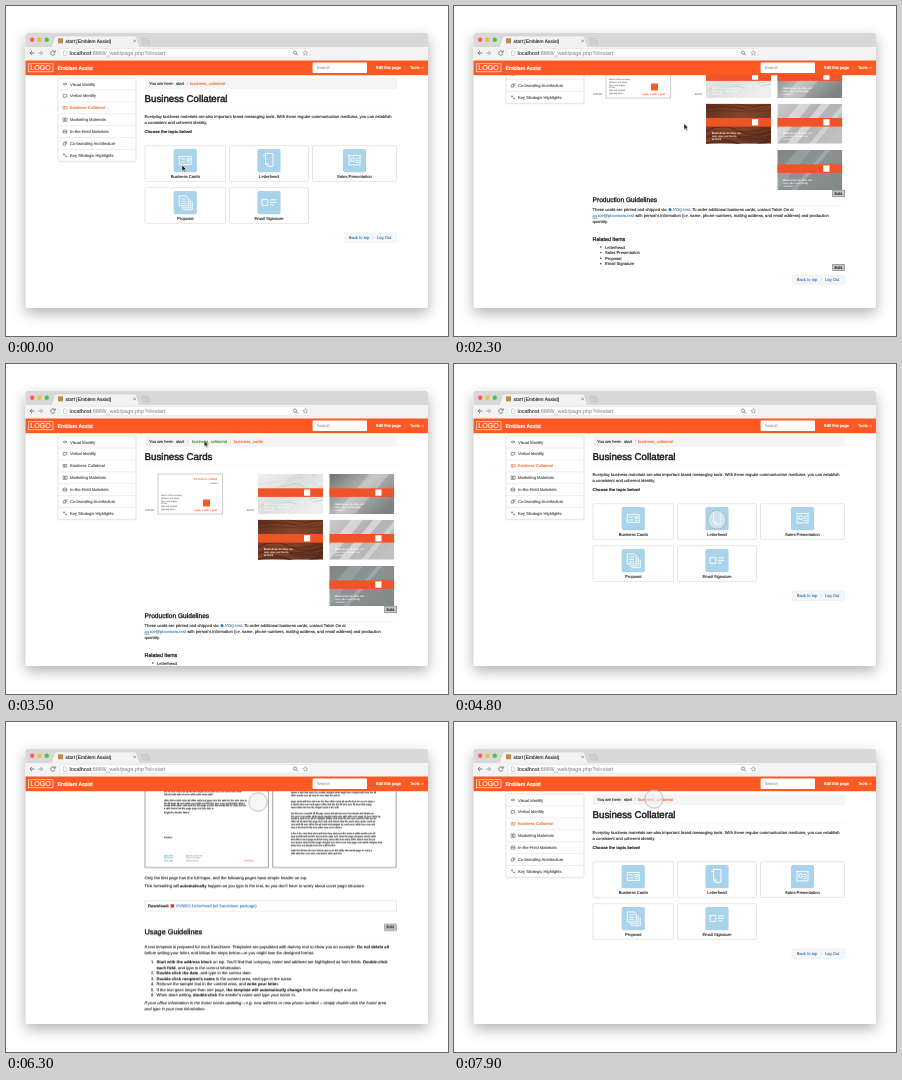
Animation of 442 by 330 pixels, one loop 8000 ms. Source, as an HTML page:

```html
<!DOCTYPE html>
<html lang="en">
<head>
<meta charset="utf-8">
<title>Style guide walkthrough</title>
<style>
  html, body { margin: 0; width: 100%; height: 100%; overflow: hidden; background: #fff; }
  svg { display: block; }
  #stage { width: 442px; height: 330px; }
  text { font-family: "Liberation Sans", Arial, sans-serif; text-rendering: geometricPrecision; white-space: pre; }
  .window { filter: drop-shadow(0 5px 7px rgba(0, 0, 0, .3)); }
</style>
</head>
<body>
<svg id="stage" viewBox="0 0 442 330"></svg>
<script>
const LOOP = 8000, STEP = 100;
const ORANGE = '#fc5a22', BLUE = '#2b74b3', GREEN = '#1f8f30', INK = '#151515';
const LEFT = 19.5, WIDTH = 402.5, RIGHT = LEFT + WIDTH;
const stage = document.getElementById('stage');

let seed = 7;
const rand = (a = 0, b = 1) => {
  seed = (seed * 16807) % 2147483647;
  return a + (b - a) * seed / 2147483647;
};

// Drawing helpers. In text, *...* is bold and [...] is a link.
const rect = (x, y, w, h, fill, extra = '') =>
  `<rect x="${x}" y="${y}" width="${w}" height="${h}" fill="${fill}" ${extra}/>`;
const path = (d, stroke, width = .6, extra = 'fill="none"') =>
  `<path d="${d}" stroke="${stroke}" stroke-width="${width}" ${extra}/>`;
const dot = (x, y, r, fill, extra = '') =>
  `<circle cx="${x}" cy="${y}" r="${r}" fill="${fill}" ${extra}/>`;
const markup = s => s
  .replace(/\*(.+?)\*/g, '<tspan font-weight="700">$1</tspan>')
  .replace(/\[(.+?)\]/g, `<tspan fill="${BLUE}" stroke="${BLUE}">$1</tspan>`);
const text = (x, y, s, size = 4.15, fill = INK, extra = '', weight = .02) =>
  `<text x="${x}" y="${y}" font-size="${size}" fill="${fill}" stroke="${fill}" stroke-width="${size * weight}" ${extra}>${markup(s)}</text>`;
const lines = (x, y, gap, list, ...style) =>
  list.map((s, i) => text(x, y + i * gap, s, ...style)).join('');
const medium = (x, y, s, size, fill = '#1a1a1a') => text(x, y, s, size, fill, '', .045);
const heading = (y, s, size) => medium(138.6, y, s, size) +
  path(`M139 ${y + size * .55}H391`, '#eee', .5);

// Browser chrome
const chrome = () => `
  <g class="window">${rect(LEFT, 27, WIDTH, 275, '#fff', 'rx="2"')}</g>
  <path d="M${LEFT} 41V29.5q0 -2.5 2.5 -2.5H${RIGHT - 2.5}q2.5 0 2.5 2.5V41Z" fill="#d8d8d8"/>
  ${dot(26.2, 33.8, 2.2, '#fb5f57')}${dot(33.4, 33.8, 2.2, '#f0bb40')}${dot(40.8, 33.8, 2.2, '#55c244')}
  ${path('M45 41.3L48.5 31.5Q49 30 50.5 30H128.5Q130 30 130.6 31.5L134 41.3Z', '#bbb', .4, 'fill="#f3f3f3"')}
  ${path('M135 32.5H142L144 38H137Z', '#b3b3b3', .4, 'fill="#cfcfcf"')}
  ${rect(52, 32.3, 5, 5, '#c08a4a')}
  ${text(59.5, 36.7, 'start &#91;Emblem Assist&#93;', 4.9, '#222')}
  ${path('M127.4 33.7L129.8 36.1M129.8 33.7L127.4 36.1', '#666', .6)}
  ${rect(LEFT, 41, WIDTH, 14, '#f3f3f3')}
  ${path('M28.5 47H24M26 45L24 47L26 49', '#666', .8)}
  ${path('M32 47H36.5M34.5 45L36.5 47L34.5 49', '#999', .8)}
  ${path('M48.8 45.9A2.2 2.2 0 1 0 49 47.7M49.2 44.5V46.2H47.4', '#666', .8)}
  ${rect(54, 42.7, 250, 8.7, '#fff', 'rx="1" stroke="#d0d0d0" stroke-width=".4"')}
  ${path('M57.5 44.8H59.7L60.8 46V49.4H57.5Z', '#888', .4)}
  ${text(63.5, 48.9, 'localhost<tspan fill="#999" stroke="#999">:8888/_web/page.php?id=start</tspan>', 5.5, '#333')}
  ${dot(289, 46.6, 1.6, 'none', 'stroke="#666" stroke-width=".7"')}${path('M290.2 47.8L291.8 49.5', '#666', .8)}
  ${path('M299.4 44.4L300.1 46.2L302 46.3L300.5 47.5L301 49.3L299.4 48.3L297.8 49.3L298.3 47.5L296.8 46.3L298.7 46.2Z', '#777', .5)}`;

const navbar = () => `
  ${rect(LEFT, 54.5, WIDTH, 14.7, ORANGE)}
  ${rect(22.5, 57.8, 24.5, 8, 'none', 'stroke="#fff" stroke-width=".6"')}
  ${text(24.3, 64.3, 'LOGO', 7.1, '#fff')}
  ${medium(51.5, 63.7, 'Emblem Assist', 5.4, '#fff')}
  ${rect(306.6, 56.5, 54.4, 10.6, '#fff', 'rx="1.2"')}
  ${text(310.7, 63.3, 'Search', 4.15, '#999')}
  ${medium(370, 63.4, 'Edit this page', 4.15, '#fff')}
  ${medium(404, 63.4, 'Tools', 4.15, '#fff')}
  <path d="M415.2 61.4H417.8L416.5 62.8Z" fill="#fff"/>`;

// Parts shared by the pages
const menu = [
  ['Visual Identity', 'M0 2Q2 0 4 2Q2 4 0 2M1.6 2H2.4'],
  ['Verbal Identity', 'M.2 .6H3.8V3H2L1 4V3H.2Z'],
  ['Business Collateral', 'M0 .7H4V3.3H0ZM.8 1.7H2M.8 2.4H3'],
  ['Marketing Materials', 'M0 .3H1.6V3.7H0ZM2.2 .3H4V3.7H2.2Z'],
  ['In-the-Field Materials', 'M0 1L2 .2L4 1V3.4H0ZM0 2H4'],
  ['Co-branding Architecture', 'M.3 1.2H2.5V3.7H.3ZM1.5 .3H3.7V2.8'],
  ['Key Strategic Highlights', 'M0 1H2M1 0V2M2 3H4M2 2L4 4']
];
const sidebar = active => rect(52, 72, 78, 83.3, '#fff', 'rx="1" stroke="#d4d4d4" stroke-width=".6"') +
  path('M52.3 155.9H130', '#e4e4e4', .6) +
  menu.map(([name, icon], i) => {
    const y = 78 + i * 11.9, color = i === active ? ORANGE : '#444';
    return (i ? path(`M52 ${y - 5.95}H130`, '#ddd', .5) : '') +
      `<g transform="translate(57 ${y - 2})">${path(icon, color, .5)}</g>` +
      text(64, y + 1.5, name, 4.1, color);
  }).join('');

const crumbs = (leaf) => {
  const y = 79.4;
  return rect(139, 72, 252, 11, '#f5f5f5', 'rx="1"') +
    text(143, y, 'You are here:') + text(170, y, 'start') + text(181, y, '/', 4.15, '#bbb') +
    (leaf ? text(186, y, 'business_collateral', 4.15, GREEN) + text(224, y, '/', 4.15, '#bbb') +
      text(228, y, leaf, 4.15, ORANGE) : text(184, y, 'business_collateral', 4.15, ORANGE));
};
const footer = y => rect(338, y, 52.5, 9.6, '#f4f6f8', 'rx="1" stroke="#e6e6e6" stroke-width=".4"') +
  text(342.7, y + 6.2, '[Back to top]') + text(366.7, y + 6.2, '/', 4.15, '#bbb') + text(370.7, y + 6.2, '[Log Out]');
const editButton = y => rect(378.7, y, 11.6, 6.3, '#c4c4c4', 'stroke="#777" stroke-width=".6"') +
  text(380.6, y + 4.6, '*Edit*', 3.9, '#222');

// Overview page
const tiles = [
  ['Business Cards', 0, 0, 'M-6 -4H6V4H-6ZM-4 1.5H0M-4 -1.5H0M2 2H4.5M1.8 -2H4.2V.3H1.8Z'],
  ['Letterhead', 1, 0, 'M-3.5 -7H4V6H-1L-3.5 3.5ZM-3.5 3.5H-1V6M-6 -5H-3.5'],
  ['Sales Presentation', 2, 0, 'M-6.5 -5H6.5M-5.5 -5V4.5H5.5V-5M-3.5 -2.5H-.5V1H-3.5ZM1 -2H4M1 0H4M1 2H4'],
  ['Proposal', 0, 1, 'M-6 -6.5H1L3 -4.5V3.5H-6ZM-4 5.5H5V-3M-2 7.3H7V-1M-4 -3.5H1M-4 -1H1M-4 1.3H1'],
  ['Email Signature', 1, 1, 'M-7 -3H-1.2V3H-7ZM1 -2.5H7M1 0H7M1 2.5H5']
];
const columns = [[139, 219.5], [223.5, 302.5], [306.5, 390.5]];
const overview = () => sidebar(2) + crumbs() + heading(96, 'Business Collateral', 9.7) +
  lines(138.6, 112, 6, [
    'Everyday business materials are also important brand messaging tools. With these regular communication mediums, you can establish',
    'a consistent and coherent identity.'
  ]) + text(138.6, 126.7, '*Choose the topic below!*') +
  tiles.map(([name, col, row, icon]) => {
    const [left, right] = columns[col], mid = (left + right) / 2, top = 139.7 + row * 42;
    return rect(left, top, right - left, 35.7, '#fff', 'rx="1" stroke="#d6d6d6" stroke-width=".6"') +
      rect(mid - 11.6, top + 3.2, 23.2, 23.4, '#a9d3ea', 'rx="2"') +
      `<g transform="translate(${mid} ${top + 14.7})">${path(icon, '#fff', .9)}</g>` +
      text(mid, top + 32.2, name, 4.15, INK, 'text-anchor="middle"');
  }).join('') + footer(227);

// Business cards page
const streaks = (n, color, width, make) =>
  Array.from({ length: n }, () => path(make(), color, rand(.3, 1) * width, 'fill="none" opacity=".4"')).join('');
const beam = (x, w, opacity) => `<path d="M${x} 40L${x + 34} 0h${w}l-34 40Z" fill="#fff" opacity="${opacity}"/>`;
const textures = {
  marble: [['#f0f0ee', '#dddfdf', '#efefee'], () => streaks(14, '#9fa4a8', 1, () => {
    const x = rand(-5, 60), y = rand(0, 40);
    return `M${x} ${y}q5 ${rand(-7, 2)} 10 ${rand(-9, 5)}t14 ${rand(-8, 6)}`;
  })],
  concrete: [['#6f7070', '#b4b5b5', '#808181'], () => beam(6, 20, .25)],
  wood: [['#5f2f1c', '#844529', '#673320'], () => streaks(24, '#35180d', 1, () => {
    const y = rand(-6, 46);
    return `M0 ${y}Q16 ${y - rand(0, 9)} 32 ${y}T66 ${y - rand(0, 8)}`;
  })],
  shade: [['#c9caca', '#b0b1b1', '#bfc0c0'], () => beam(-12, 12, .4) + beam(10, 9, .45) + beam(32, 6, .35)],
  stone: [['#7d8484', '#8d9393', '#838989'], () => beam(-14, 14, .14) + beam(14, 5, .18)]
};
const cardBack = (x, y, kind) => {
  const [stops, detail] = textures[kind];
  return `<svg x="${x}" y="${y}" width="65" height="40" viewBox="0 0 65 40">
    <linearGradient id="${kind}" x2="1" y2=".7">${stops.map((c, i) => `<stop offset="${i / 2}" stop-color="${c}"/>`).join('')}</linearGradient>
    ${rect(0, 0, 65, 40, `url(#${kind})`)}${detail()}
    ${rect(0, 14.3, 65, 8.6, '#ee5427')}${rect(46, 15.5, 6.2, 6.2, '#fff')}
    ${lines(6, 30.8, 2.9, ['*Blank* design for office sets', 'clear, open and friendly', 'all round'], 2.4, '#fff')}
  </svg>`;
};
const cards = () => sidebar(-1) + crumbs('business_cards') + heading(96, 'Business Cards', 9.7) +
  text(139, 147.2, 'FRONT', 2.7, '#777') + text(240.7, 147.2, 'BACK', 2.7, '#777') +
  rect(152, 110, 64.7, 40, '#fff', 'stroke="#bbb" stroke-width=".7"') +
  text(211.5, 115.8, 'Person’s Name', 3, ORANGE, 'text-anchor="end" letter-spacing=".25"') +
  text(211.5, 119.7, 'Position', 2.2, '#777', 'text-anchor="end"') +
  lines(155, 131.7, 2.9, ['Name of the company', 'Number and street', 'Town and region', 'Phone', 'Mail and website', 'Opening hours'], 2.2, '#666') +
  rect(197, 135.5, 7, 7, ORANGE) + text(188.5, 147, '*paper + print + post*', 2.4, ORANGE) +
  cardBack(252, 110, 'marble') + cardBack(323.3, 110, 'concrete') +
  cardBack(252, 155.7, 'wood') + cardBack(323.3, 155.7, 'shade') + cardBack(323.3, 202, 'stone') +
  editButton(242.5) + heading(254.2, 'Production Guidelines', 6.6) +
  text(138.6, 263, 'These cards are printed and shipped via') +
  dot(216, 261.5, 1.5, BLUE) +
  text(219, 263, '[VOQ.test]. To order additional business cards, contact Talvin Oe at') +
  path('M139 267.8H142.8V270.5H139ZM139 267.8L140.9 269.3L142.8 267.8', BLUE, .5) +
  text(144, 269.2, '[toe@plovenara.test] with person’s information (i.e. name, phone numbers, mailing address, and email address) and production') +
  text(138.6, 275.2, 'quantity.') + medium(138.6, 292.5, 'Related Items', 5.3) +
  ['Letterhead', 'Sales Presentation', 'Proposal', 'Email Signature'].map((s, i) =>
    dot(146.8, 299 + i * 5.6, .7, INK) + text(151, 300.5 + i * 5.6, s)).join('') +
  editButton(316.3) + footer(327);

// Letterhead page
const vocabulary = 'the page text with each clear line for simple letters and even margins that carry a calm tone over all office notes while new words fill this space'.split(' ');
const filler = n => {
  let s = '';
  while (s.length < n) s += vocabulary[Math.floor(rand(0, vocabulary.length))] + ' ';
  return s.slice(0, n).trim();
};
const paragraphs = (x, y, counts, chars) => counts.map(count => {
  const list = Array.from({ length: count }, (_, i) => filler(i === count - 1 ? chars * .6 : chars));
  const top = y;
  y += (count + 1) * 2.9;
  return lines(x, top, 2.9, list, 2.3, '#111', '', .05);
}).join('');
const note = (x, y, gap, list) => lines(x, y, gap, list, 2.3, '#111', '', .04);
const sheet = x => rect(x, 111, 123.3, 159.5, '#fff', 'stroke="#8c8c8c" stroke-width=".8"');
const letters = () => sheet(139) +
  rect(146, 124.7, 109.5, 5, ORANGE) + rect(164, 125.5, 3.4, 3.4, '#fff') +
  text(228, 128, 'Office of letters', 2.1, '#fff') +
  note(158, 135.5, 2.9, ['Recipient name', 'Name of company', 'Number and street', 'Town, region']) +
  note(158, 154.5, 0, ['Month 00, 0000']) +
  paragraphs(158, 163, [6], 86) + note(158, 184, 0, ['*Line about the subject of this page*']) +
  paragraphs(158, 189.5, [4, 4], 86) +
  note(158, 216.5, 0, ['*Regards, Sender Name*']) + note(158, 241, 0, ['Position']) +
  lines(158, 259, 2.7, ['Main office', 'Telephone', 'Web page'], 2, '#3f8fb0') +
  lines(180, 259, 2.7, ['Number and street', 'Town and region', 'Mail for letters'], 2, '#888') +
  text(237, 264.4, 'Page footer', 2.1, ORANGE) +
  sheet(266.8) + path('M274 129.5H383', ORANGE, .5) + text(281.5, 128.3, 'Name of the company', 2.1, ORANGE) +
  paragraphs(285, 135.8, [7, 5, 2, 6, 3, 6, 5, 2], 86);
const letterhead = () => sidebar(-1) + crumbs('letterhead') + heading(96.2, 'Letterhead', 9.8) +
  `<g transform="translate(0 -3.3)">` + letters() +
  text(138.6, 282.6, 'Only the first page has the full logos, and the following pages have simple header on top.') +
  text(138.6, 290.7, 'This formatting will *automatically* happen as you type in the text, so you don’t have to worry about cover page structure.') +
  rect(139, 303.5, 251.5, 10.8, '#fff', 'stroke="#ddd" stroke-width=".6"') +
  text(142, 310.4, '*Download:*') + rect(164.5, 307.3, 3.6, 3.3, '#d43b2d') +
  text(169.7, 310.4, '[VUNDO Letterhead (all franchisee package)]') +
  editButton(327.2) + heading(337.3, 'Usage Guidelines', 7.3) +
  lines(138.6, 351, 6, [
    'A text template is prepared for each franchisee. Templates are populated with dummy text to show you an example. *Do not delete all*',
    'before writing your letter, and follow the steps below—or you might lose the designed format.'
  ]) +
  ['1.', '', '2.', '3.', '4.', '5.', '6.'].map((s, i) => text(145, 366.4 + i * 5.55, s)).join('') +
  lines(150.5, 366.4, 5.55, [
    '*Start with the address block* on top. You’ll find that company, name and address are highlighted as form fields. *Double-click*',
    '*each field*, and type in the correct information.',
    '*Double-click the date*, and type in the correct date.',
    '*Double-click recipient’s name* in the content area, and type in the name.',
    'Remove the sample text in the content area, and *write your letter*.',
    'If the text goes longer than one page, *the template will automatically change* from the second page and on.',
    'When done writing, *double-click* the sender’s name and type your name in.'
  ]) +
  lines(138.6, 407.7, 6, [
    'If your office information in the footer needs updating – e.g. new address or new phone number – simply double-click the footer area',
    'and type in your new information.'
  ], 4.15, INK, 'font-style="italic"') + '</g>';

stage.innerHTML = `${chrome()}
  <clipPath id="view">${rect(LEFT, 69, WIDTH, 233, '#000')}</clipPath>
  <g clip-path="url(#view)">
    <g id="overview">${overview()}</g><g id="cards">${cards()}</g><g id="letterhead">${letterhead()}</g>
  </g>
  ${navbar()}
  <g id="arrow">${path('M0 0V6.2L1.5 4.9L2.5 7.2L3.5 6.8L2.5 4.5H4.5Z', '#fff', .5, 'fill="#111"')}</g>
  <g id="ring">${dot(0, 0, 9.2, '#eee', 'fill-opacity=".55" stroke="#aaa" stroke-width=".7"')}</g>`;

// Timeline: [time, value...]; numbers ease from one row to the next, names hold.
const shown = [[0, 'overview'], [500, 'cards'], [3900, 'overview'], [4900, 'letterhead'], [7600, 'overview']];
// The letterhead page bounces a little past its top.
const scroll = {
  overview: [[0, 0]],
  cards: [[0, 0], [1900, 0], [2300, 58], [2800, 58], [3300, 0]],
  letterhead: [[0, 0], [5400, 0], [5800, 121.7], [6400, 121.7], [6900, -3.3], [7200, 0]]
};
const pointer = [
  [0, 176, 159], [1000, 176, 159], [1300, 172, 156], [1700, 172, 156], [2200, 230, 117.5], [2700, 230, 117.5],
  [3400, 198.3, 76.5], [4000, 198.3, 76.5], [4600, 263, 156], [5100, 263, 156], [5700, 252, 80],
  [6300, 252, 80], [6900, 256.3, 274], [7100, 256.3, 274], [7500, 200, 77]
];
const pointerKind = [[0, 'arrow'], [300, 'ring'], [1600, 'arrow'], [3600, 'ring'], [4100, 'arrow'],
  [4700, 'ring'], [7100, 'arrow'], [7500, 'ring']];

const rowAt = (table, t) => table.findLastIndex(row => row[0] <= t);
const held = (table, t) => table[rowAt(table, t)][1];
const eased = (table, t) => {
  const i = rowAt(table, t), a = table[i], b = table[i + 1] || a;
  const k = b === a ? 0 : (t - a[0]) / (b[0] - a[0]), e = k * k * (3 - 2 * k);
  return a.slice(1).map((v, n) => v + (b[n + 1] - v) * e);
};
const play = (id, frame) => {
  const count = LOOP / STEP;
  document.getElementById(id).animate(
    Array.from({ length: count + 1 }, (_, i) => ({ offset: i / count, easing: 'step-end', ...frame(i * STEP) })),
    { duration: LOOP, iterations: Infinity });
};
for (const id in scroll) play(id, t => ({
  opacity: held(shown, t) === id ? 1 : 0,
  transform: `translate(0px, ${-eased(scroll[id], t)[0]}px)`
}));
for (const id of ['arrow', 'ring']) play(id, t => {
  const [x, y] = eased(pointer, t);
  return { opacity: held(pointerKind, t) === id ? 1 : 0, transform: `translate(${x}px, ${y}px)` };
});
</script>
</body>
</html>
```
